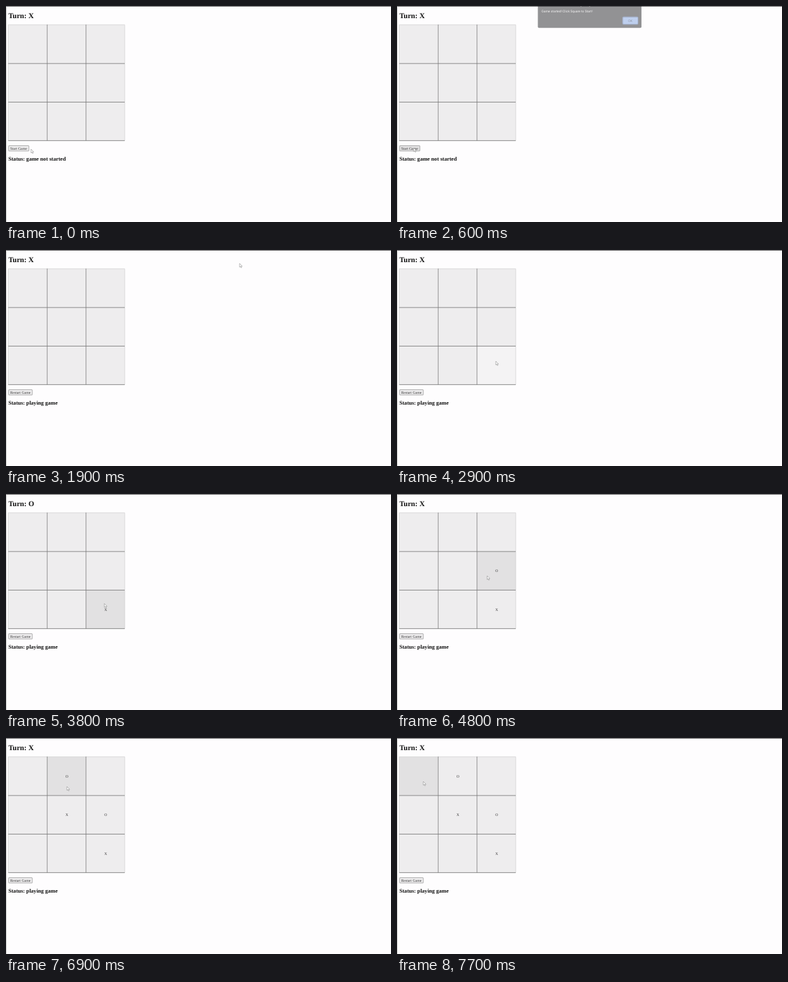
Recreate the animation shown at these times as an HTML page. Size 600 px wide and 338 px high, loop 8 s.

```html
<!DOCTYPE html>
<html lang="en">
<head>
<meta charset="utf-8">
<style>
html, body { margin: 0; width: 100%; height: 100%; overflow: hidden; background: #fefdfe; }
svg { display: block; width: 600px; height: 338px; }
text { font-family: "Liberation Serif", "Times New Roman", serif; fill: #111; text-rendering: geometricPrecision; }
.head { font-weight: bold; }
.small { font-size: 5.85px; fill: #333; }
.mark { text-anchor: middle; }
#alert text { font: 5px Roboto, "Open Sans", sans-serif; fill: #eee; }
</style>
</head>
<body>
<svg viewBox="0 0 600 338">
  <rect width="600" height="338" fill="#fefdfe"/>
  <path d="M0 .5H600" stroke="#5c5b5d"/>
  <path d="M.3 0V338" stroke="#999" stroke-width=".6"/>
  <text id="turn" class="head" x="3.7" y="19" font-size="11.5"></text>
  <g id="cells"></g>
  <g fill="none">
    <path d="M3.5 211V29.4H185V211" stroke="#cfcfcf" stroke-width=".7"/>
    <path d="M64.2 29V211M124.7 29V211" stroke="#777" stroke-width=".8"/>
    <path d="M3.5 90H185M3.5 150.4H185M3.5 210.7H185" stroke="#777" stroke-width=".9"/>
  </g>
  <g id="marks"></g>
  <rect id="button" x="4" y="218.6" height="8.3" rx=".7" stroke="#8b8b8b" stroke-width=".7"/>
  <text id="label" class="small" x="6.4" y="224.6"></text>
  <text id="status" class="head" x="3.7" y="242" font-size="8.6"></text>
  <g id="alert">
    <path d="M219.5 0H381V32.5Q381 34.3 379.2 34.3H221.3Q219.5 34.3 219.5 32.5Z" fill="#28292c"/>
    <path d="M286 .4h1.5m12 0h1.5" stroke="#aaa" stroke-width=".8"/>
    <text x="225.3" y="10">Game started! Click Square to Start!</text>
    <rect x="351.8" y="17.2" width="23.8" height="11.4" rx="1.6" fill="#7fa3e0" stroke="#4c6596" stroke-width="1.2"/>
    <text x="360.2" y="24.8" style="fill:#28324a">OK</text>
  </g>
  <path id="cursor" d="M0 0V5.9L1.4 4.6L2.3 6.8L3.3 6.4L2.4 4.3H4.2Z" fill="#fff" stroke="#777" stroke-width=".5"/>
</svg>
<script>
const $ = id => document.getElementById(id);
const SIZE = 60.5, LEFT = 3.7, TOP = 29.4, LOOP = 8000, STEP = 100;

// Pointer stops: time, x, y
const path = [
  [0, 39, 224], [400, 26, 222], [700, 26, 222], [1500, 364, 21], [1900, 364, 21],
  [2700, 154, 174], [3700, 154, 174], [4400, 140.5, 128], [5100, 140.5, 128],
  [5700, 97.5, 129.5], [6400, 97.5, 129.5], [6800, 95, 76], [7100, 95, 76], [7700, 41, 68]
];

// Moves of the game: time, cell, player
const moves = [[3000, 8, "X"], [4700, 5, "O"], [5900, 4, "X"], [6900, 1, "O"]];

function add(parent, tag, attrs) {
  const el = document.createElementNS("http://www.w3.org/2000/svg", tag);
  for (const key in attrs) el.setAttribute(key, attrs[key]);
  return parent.appendChild(el);
}

const cells = [], marks = [];
for (let i = 0; i < 9; i++) {
  const x = LEFT + i % 3 * SIZE, y = TOP + Math.floor(i / 3) * SIZE;
  cells.push(add($("cells"), "rect", { x, y, width: SIZE, height: SIZE }));
  marks.push(add($("marks"), "text", { x: x + SIZE / 2 + .3, y: y + 32.5, class: "small mark" }));
}

function pointer(t) {
  const next = path.findIndex(p => p[0] > t);
  if (next < 0) return path[path.length - 1].slice(1);
  const [t0, x0, y0] = path[next - 1], [t1, x1, y1] = path[next];
  const k = (t - t0) / (t1 - t0), e = k * k * (3 - 2 * k);
  return [x0 + (x1 - x0) * e, y0 + (y1 - y0) * e];
}

function draw(t) {
  const [x, y] = pointer(t);
  const started = t >= 1800;
  const done = moves.filter(m => t >= m[0]);
  const col = Math.floor((x - LEFT) / SIZE), row = Math.floor((y - TOP) / SIZE);
  const inside = col >= 0 && col < 3 && row >= 0 && row < 3;
  const hover = started && inside ? row * 3 + col : -1;
  const pressed = moves.some(m => t >= m[0] - STEP && t < m[0]);

  cells.forEach((cell, i) => {
    cell.setAttribute("fill", i !== hover ? "#eeedee" : pressed ? "#f4f3f4" : "#e2e1e2");
    const move = done.find(m => m[1] === i);
    marks[i].textContent = move ? move[2] : "";
  });

  $("turn").textContent = "Turn: " + "XO"[done.length % 2];
  $("label").textContent = started ? "Restart Game" : "Start Game";
  $("status").textContent = "Status: " + (started ? "playing game" : "game not started");
  $("button").setAttribute("width", started ? 37 : 31.7);
  $("button").setAttribute("fill", t >= 200 && t < 700 ? "#e2e1e2" : "#eeedee");
  $("alert").setAttribute("opacity", t < 600 || t >= 1900 ? 0 : t < 700 || t >= 1800 ? .5 : 1);
  $("cursor").setAttribute("transform", `translate(${x} ${y})`);
}

function frame() {
  draw(Math.floor(performance.now() % LOOP / STEP) * STEP);
  requestAnimationFrame(frame);
}
frame();
</script>
</body>
</html>
```
